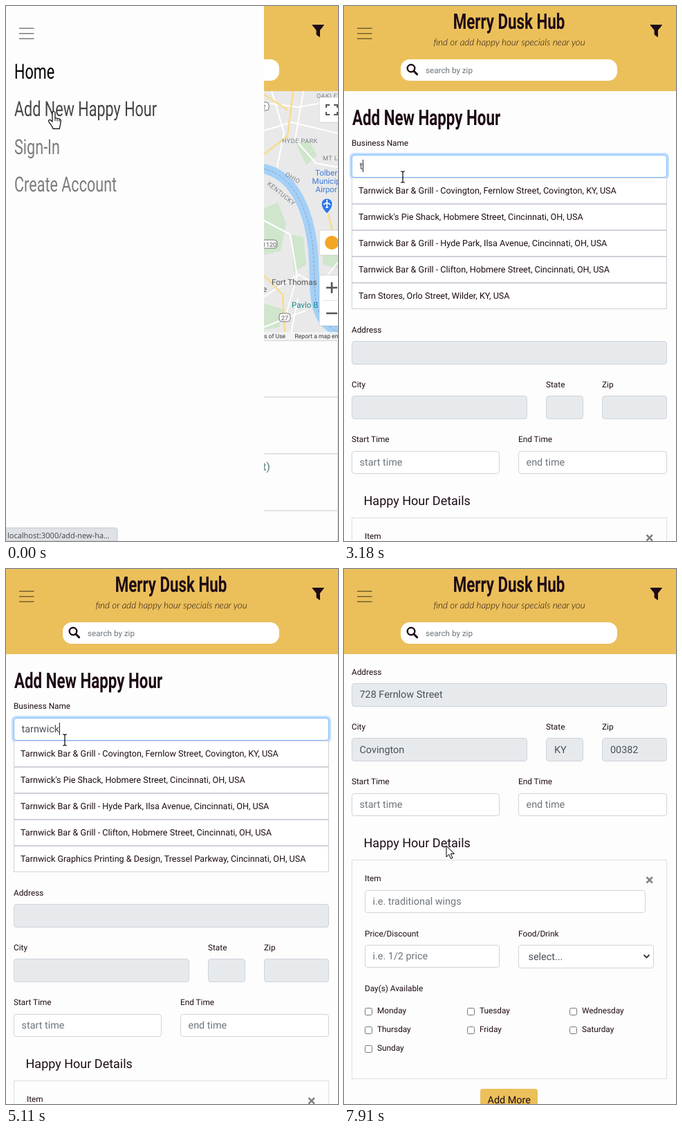
These frames come from a looping animation (480x773 px, 8000 ms). An HTML page:

```html
<!DOCTYPE html>
<html lang="en">
<head>
<meta charset="utf-8">
<title>Add New Happy Hour</title>
<style>
html, body { margin: 0; height: 100%; overflow: hidden; background: #fdfdfd; }
svg { display: block; width: 100%; height: 100%; }
text { font-family: Roboto, "Liberation Sans", sans-serif; white-space: pre; text-rendering: geometricPrecision; }
</style>
</head>
<body>
<svg id="stage" viewBox="0 0 480 773" xmlns="http://www.w3.org/2000/svg"></svg>
<script>
const INK = '#1d0b16', GOLD = '#ebc05b', PAPER = '#fdfdfd', FIELD = '#495057', HINT = '#6c757d';
const LOOP = 8000, ROW = 38, LIST_HEIGHT = 5 * ROW, SCROLL = 129, CONDENSED = 0.72;
const QUERY = 'tarnwick', PICKED = 'Tarnwick Bar & Grill - Covington';

// Markup helpers
const esc = s => s.replace(/&/g, '&amp;');
const text = (x, y, s, size, fill = INK, attrs = '') =>
  `<text x="${x}" y="${y}" font-size="${size}" fill="${fill}" ${attrs}>${esc(s)}</text>`;
const rect = (x, y, w, h, fill, attrs = '') =>
  `<rect x="${x}" y="${y}" width="${w}" height="${h}" fill="${fill}" ${attrs}/>`;
const path = (d, stroke, width = 1, fill = 'none', attrs = '') =>
  `<path d="${d}" stroke="${stroke}" stroke-width="${width}" fill="${fill}" ${attrs}/>`;
const group = (id, body, attrs = '') => `<g id="${id}" ${attrs}>${body}</g>`;
const condensed = (x, y, s, size, weight, fill = INK, attrs = '') =>
  `<g transform="translate(${x} ${y}) scale(${CONDENSED} 1)">` +
  text(0, 0, s, size, fill, `font-weight="${weight}" ${attrs}`) + '</g>';
const label = (x, y, s) => text(x, y, s, 11.8);
const box = (x, y, w, fill = '#fff', h = 33) =>
  rect(x + .5, y + .5, w - 1, h - 1, fill, 'stroke="#ced4da" rx="3.6"');
const input = (x, y, w, hint) => box(x, y, w) + text(x + 11.5, y + 21, hint, 14.4, HINT);
const locked = (x, y, w) => box(x, y, w, '#e7eaed', 34);
const burger = () => path('M19 32.2h21.5M19 39.7h21.5M19 47.2h21.5', '#000', 1.6, 'none', 'opacity=".5"');

function header() {
  return rect(0, 0, 480, 123, GOLD) + burger() +
    condensed(238.5, 33, 'Merry Dusk Hub', 31, 700, INK, 'text-anchor="middle"') +
    text(239, 57, 'find or add happy hour specials near you', 13.4, INK,
      'text-anchor="middle" font-style="italic" font-weight="300" style="font-family:Lato,sans-serif"') +
    rect(82, 77, 313, 31, '#fff', 'rx="13"') +
    '<circle cx="97" cy="90" r="5.3" fill="none" stroke="#1d0b16" stroke-width="2.4"/>' +
    path('M101 94l4.6 4.6', INK, 3, 'none', 'stroke-linecap="round"') +
    text(118, 97, 'search by zip', 11.7, HINT) +
    path('M443 27.5h16.5l-6 7.5v9.5l-4.4-3.2V35Z', INK, 1, INK, 'stroke-linejoin="round"');
}

function formTop() {
  return condensed(12, 172, 'Add New Happy Hour', 31, 700) +
    label(11, 202, 'Business Name') +
    box(11, 215, 456) +
    group('focus',
      rect(9.6, 213.6, 458.8, 35.8, 'none', 'rx="5" stroke="#007bff" stroke-opacity=".25" stroke-width="2.9"') +
      rect(11.5, 215.5, 455, 32, 'none', 'rx="3.6" stroke="#80bdff"')) +
    `<text id="business" x="22.5" y="236" font-size="14.4"></text>` +
    rect(0, 222, 1, 18, '#222', 'id="caret"');
}

function formRest() {
  const days = ['Monday', 'Tuesday', 'Wednesday', 'Thursday', 'Friday', 'Saturday', 'Sunday'];
  const checks = days.map((day, i) => {
    const x = 30 + i % 3 * 148, y = 763 + Math.floor(i / 3) * 27;
    return rect(x + .5, y + .5, 10, 10, '#fff', 'stroke="#767676" rx="2"') + label(x + 18, y + 8, day);
  }).join('');
  const filled = [[22.5, 315, '728 Fernlow Street'], [22.5, 395, 'Covington'], [304, 395, 'KY'], [385, 395, '00382']];
  return label(11, 282, 'Address') + locked(11, 294, 456) +
    label(11, 361, 'City') + locked(11, 373, 254) +
    label(292, 361, 'State') + locked(292, 373, 54) +
    label(373, 361, 'Zip') + locked(373, 373, 94) +
    group('filled', filled.map(([x, y, s]) => text(x, y, s, 14.4, FIELD)).join('')) +
    label(11, 440, 'Start Time') + input(11, 453, 214, 'start time') +
    label(252, 440, 'End Time') + input(252, 453, 215, 'end time') +
    text(28.5, 531, 'Happy Hour Details', 18) +
    rect(11.5, 549.5, 455, 316, 'none', 'stroke="#dedede"') +
    label(30, 580, 'Item') + path('M437.5 574.2l8.4 8.4m0-8.4l-8.4 8.4', '#7f7f7f', 2.5) +
    input(30, 593, 406, 'i.e. traditional wings') +
    label(30, 660, 'Price/Discount') + input(30, 672, 195, 'i.e. 1/2 price') +
    label(252, 660, 'Food/Drink') + box(252, 672, 196, '#fff', 34) +
    text(266.5, 694, 'select...', 14.4, FIELD) +
    path('M433.5 686.5l4 4 4-4', '#333', 1.8) +
    label(30, 739, 'Day(s) Available') + checks +
    rect(197, 880, 83, 34, GOLD, 'rx="3.6"') + text(207.5, 901, 'Add More', 14.4);
}

function suggestions() {
  const city = ', Cincinnati, OH, USA';
  const names = [
    PICKED + ', Fernlow Street, Covington, KY, USA',
    "Tarnwick's Pie Shack, Hobmere Street" + city,
    'Tarnwick Bar & Grill - Hyde Park, Ilsa Avenue' + city,
    'Tarnwick Bar & Grill - Clifton, Hobmere Street' + city,
    ''
  ];
  return names.map((name, i) => {
    const y = 248 + i * ROW;
    return rect(11.5, y + .5, 455, ROW - 1, '#fff', `stroke="#ced1d8" id="row${i}"`) +
      text(21, y + 23, name, 12.6, INK, `id="name${i}"`);
  }).join('');
}
const LAST_ROW = [
  'Tarn Stores, Orlo Street, Wilder, KY, USA',
  'Tarnwick Graphics Printing & Design, Tressel Parkway, Cincinnati, OH, USA'
];

function mapPage() {
  const river = 'M366 234C398 238 420 262 433 300S445 370 446 402 452 458 482 472';
  const area = (x, y, s, attrs = '') => text(x, y, s, 9, '#7b7f84', 'letter-spacing=".5" ' + attrs);
  const place = (y, s) => text(463, y, s, 11.5, '#3d78d8', 'text-anchor="middle"');
  const shield = (x, y, w, s) => rect(x - w / 2, y - 6, w, 12, '#fff', 'rx="4" stroke="#777"') +
    text(x, y + 3.5, s, 9, '#555', 'text-anchor="middle"');
  const control = (y, h) => rect(453, y, 40, h, '#fff', 'rx="2" stroke="#000" stroke-opacity=".12"');
  return rect(0, 123, 480, 650, PAPER) + rect(0, 123, 480, 360, '#e9e9e9') +
    path('M373 292l20-8 12 30-8 40-24 6ZM412 330l18 4 4 40-18 10ZM456 330l30 10v40l-28-6ZM373 430l28 8-6 26-22 4ZM420 200l18-6 12 22-16 14Z', 'none', 0, '#cfe6cd') +
    path('M373 180l40-12 67 16M384 123l18 60-10 50M430 123l-12 70 30 34 32 6M373 310l38 20 10 60-16 56M373 420l50-32 24 14M373 464l60-24M410 483l12-60M373 140l50 6 57-10M456 400l24-30', '#fff', 2) +
    path('M373 214l34-26 8-65M373 128l34 22M466 300l14 60M404 483l-4-66-27-28', '#f8dc8c', 2.5) +
    path(river, '#a4d0f8', 14) + path(river, '#8f9aa5', .8, 'none', 'stroke-dasharray="4 2"') +
    area(449, 133, 'OAKLEY') + area(399, 198, 'HYDE PARK') + area(458, 223, 'MT LOOKOUT') +
    area(0, 0, 'OHIO', 'transform="translate(403 245) rotate(31)"') +
    area(0, 0, 'KENTUCKY', 'transform="translate(377 258) rotate(39)"') +
    place(245, 'Tolber') + place(257, 'Municip') + place(269, 'Airpor') +
    path('M464 300q-8-8-8-14a8 8 0 0 1 16 0q0 6-8 14Z', '#fff', .8, '#2f78e4') +
    path('M464 280v11M459 287l5-3 5 3M462 291h4', '#fff', 1.6) +
    text(384, 403, 'Fort Thomas', 11.5, '#555') + text(413, 436, 'Pavlo B', 11.5, '#178a93') +
    text(371, 413, 'e', 11.5, '#555') +
    shield(381, 344, 22, '1120') + shield(403, 450, 16, '27') + shield(373, 145, 14, '2') +
    control(132, 36) + path('M463 147v-4h5M474 143h5v4M463 153v4h5M474 157h5v-4', '#555', 2) +
    control(324, 36) + '<circle cx="471" cy="342" r="10" fill="#f4a623"/>' +
    control(389, 73) + path('M458 425.5h22', '#e3e3e3') +
    path('M463 407h16M471 399v16M463 444h16', '#555', 2.6) +
    rect(373, 471, 107, 12, '#f5f5f5', 'opacity=".85"') +
    text(373, 480, 's of Use', 8.6, '#333') + text(417.5, 480, 'Report a map error', 8.6, '#333') +
    path('M0 483.5h480M0 565h480M0 647h480M0 729h480', '#dcdcdc', 1.6) +
    path('M479.5 483v290', '#dcdcdc') +
    text(371, 671, 't)', 16, '#6f938f', 'font-weight="500"');
}

function menu() {
  const item = (y, s, fill) => condensed(12, y, s, 30, 400, fill);
  return rect(0, 0, 373, 773, PAPER) + burger() + item(105, 'Home', '#000') +
    item(159, 'Add New Happy Hour', '#444') + item(213.5, 'Sign-In', '#7c7c7c') +
    item(268, 'Create Account', '#7c7c7c');
}

const status = () => path('M0 754h158q3 0 3 3v16H0Z', '#c6c9ce', 1, '#dee1e6') +
  text(2, 769, 'localhost:3000/add-new-ha...', 11, '#444', 'style="font-family:\'Open Sans\',sans-serif"');

const cursors = () =>
  group('hand', path('M-2 1.5a2 2 0 0 1 4 0V8.5l6 1.5q2.6.8 2.3 3.6L9.3 19.5 8.3 24.3H-1L-3 20-7 14.6q-1-2 .4-3 1.6-.5 2.7.8L-2 14.2Z', '#000', 1.2, '#fff', 'stroke-linejoin="round"') +
    path('M2 9v4M5 10v3.5M8 11v3', '#000')) +
  group('arrow', path('M0 0V16l3.8-3.6 2.6 6.2 2.6-1-2.7-6.1H11.5Z', '#000', 1, '#fff')) +
  group('beam', path('M-3-8h2l1 1 1-1h2M0-7V7M-3 8h2l1-1 1 1h2', '#000', 1.2));

document.getElementById('stage').innerHTML =
  rect(0, 0, 480, 773, PAPER) +
  group('form', formTop() + group('rest', formRest()) + group('list', suggestions())) +
  group('map', mapPage()) + header() + group('menu', menu()) +
  group('status', status()) + group('cursor', cursors());

const $ = id => document.getElementById(id);
const show = (id, on) => $(id).setAttribute('visibility', on ? 'inherit' : 'hidden');
const move = (id, x, y) => $(id).setAttribute('transform', `translate(${x} ${y})`);

// Progress that advances in n held steps, the first at a and the last at b.
const steps = (t, a, b, n) =>
  t < a ? 0 : Math.min(n, Math.floor((t - a) / (b - a) * (n - 1) + 1.001)) / n;
const smooth = p => p * p * (3 - 2 * p);
const within = (t, spans) => spans.some(([a, b]) => t >= a && t < b);

// [time, letters typed]; results come back shortly after each key.
const KEYS = [[2910, 1], [3190, 2], [3470, 3], [3750, 4], [4020, 6], [4430, 7], [4690, 8]];
const FETCH = 120, PICK = 6240;
const CARET_ON = [[1355, 1900], [2480, 5260], [5790, 6740], [7220, 7775]];
const GLIDES = [[693, 1100, 4, 16, 94], [5540, 5790, 3, 36, 17], [6660, 7220, 5, 27, 136]];

function drawBusiness(t) {
  const key = KEYS.filter(k => t >= k[0]).pop();
  const count = key ? key[1] : 0;
  const open = !!key && t >= key[0] + FETCH && t < PICK;
  const value = t >= PICK ? PICKED : QUERY.slice(0, count);
  const field = $('business');
  field.textContent = value || 'enter business name';
  field.setAttribute('fill', value ? FIELD : HINT);
  $('caret').setAttribute('x', 22 + (value ? Math.round(field.getComputedTextLength()) : 0));
  show('caret', within(t, CARET_ON));
  $('focus').setAttribute('opacity', steps(t, 1220, 1490, 3));
  show('list', open);
  move('rest', 0, open ? LIST_HEIGHT : 0);
  $('name4').textContent = LAST_ROW[count < 4 ? 0 : 1];
  $('row0').setAttribute('fill', t >= 5540 ? '#f1f1f1' : '#fff');
}

function drawCursor(t) {
  let x = 69, y = 153;
  for (const [a, b, n, dx, dy] of GLIDES) {
    const p = smooth(steps(t, a, b, n));
    x += dx * p;
    y += dy * p;
  }
  move('cursor', x, y);
  const shape = t < 693 || within(t, [[5540, PICK]]) ? 'hand'
    : within(t, [[1100, 5540]]) ? 'beam' : 'arrow';
  ['hand', 'arrow', 'beam'].forEach(id => show(id, id === shape));
}

function draw(t) {
  drawBusiness(t);
  drawCursor(t);
  show('map', t < 150);
  show('status', t < 557);
  move('menu', -373 * smooth(steps(t, 150, 557, 4)), 0);
  show('filled', t >= 6520);
  move('form', 0, -SCROLL * Math.sin(steps(t, 7640, 7910, 3) * Math.PI / 2));
}

const start = performance.now();
function tick() {
  draw((performance.now() - start) % LOOP);
  requestAnimationFrame(tick);
}
tick();
</script>
</body>
</html>
```
